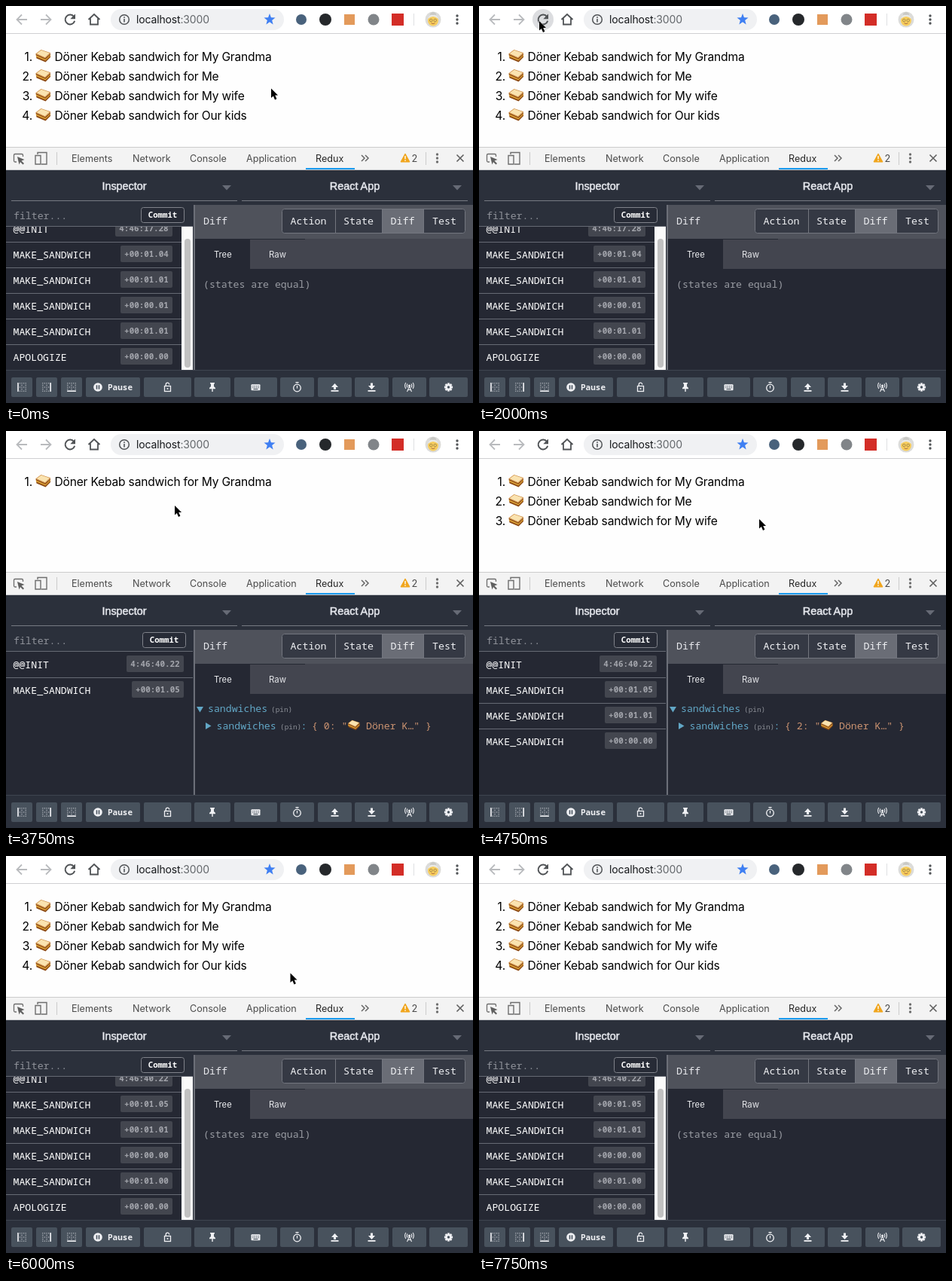
An HTML page that plays this animation: 620 by 527 pixels, repeating every 8500 ms.

```html
<!DOCTYPE html>
<html lang="en">
<head>
<meta charset="utf-8">
<title>Sandwich shop</title>
<style>
  html, body { margin: 0; width: 100%; height: 100%; overflow: hidden; background: #fff; }
  svg { display: block; width: 100vw; height: 100vh; }
  text { white-space: pre; }
  .ui { font-family: Inter, "Open Sans", sans-serif; }
  .head { font-family: "Liberation Sans", Arial, sans-serif; font-size: 14.4px; fill: #e6e8ee; stroke: #e6e8ee; stroke-width: .5; text-anchor: middle; }
  .mono { font-family: "Noto Sans Mono", "DejaVu Sans Mono", monospace; }
  .line { fill: none; stroke-width: 1.8; }
</style>
</head>
<body>
<svg id="stage" viewBox="0 0 620 527" preserveAspectRatio="none"></svg>
<script>
const LOOP = 8500, STEP = 250;
const DARK = '#252833', BAR = '#2b303b', KEY = '#48525d', EDGE = '#666a74', INK = '#505356', ICON = '#f0f1f4';

const rect = (x, y, w, h, fill, more = '') =>
  `<rect x="${x}" y="${y}" width="${w}" height="${h}" fill="${fill}" ${more}/>`;
const circle = (x, y, r, fill, more = '') => `<circle cx="${x}" cy="${y}" r="${r}" fill="${fill}" ${more}/>`;
const path = (d, fill, more = '') => `<path d="${d}" fill="${fill}" ${more}/>`;
const stroke = (d, color, width = 1.8) =>
  `<path class="line" d="${d}" stroke="${color}" style="stroke-width:${width}"/>`;
const text = (cls, x, y, size, fill, str, more = '') =>
  `<text class="${cls}" x="${x}" y="${y}" font-size="${size}" fill="${fill}" ${more}>${str}</text>`;
const ui = (...a) => text('ui', ...a);
const mono = (...a) => text('mono', ...a);
const at = (x, y, body, scale = 1) => `<g transform="translate(${x} ${y}) scale(${scale})">${body}</g>`;
const dots = (x, y, color) => [-5, 0, 5].map(d => circle(x, y + d, 1.7, color)).join('');

const sandwich =
  path('M.5 6.5L13 12L20 6V11L13.5 17.5L1.500 12.500Z', '#8f4d17') +
  path('M.8 8.500L13.300 14L20 7.800V9L13.300 15.300L.9 9.900Z', '#f0b93f') +
  path('M.2 6.500L7.500 1L20.300 5.200L13 12.500Z', '#cf8f45') +
  path('M1.700 6.200L7.700 1.700L18.800 5.400L12.800 11.200Z', '#fae3b0');

const arrow = dir => stroke(`M${7 * dir} 0H${-6 * dir}M0 -6.5L${-6.5 * dir} 0L0 6.5`, '#b9bbbe');
const reloadIcon = stroke('M5.2 -3.8A6.4 6.4 0 1 0 6.2 1.8', INK, 2) + path('M7 -7.5V-.8H.3Z', INK);
const stopIcon = stroke('M-5.5 -5.5L5.5 5.5M5.5 -5.5L-5.5 5.5', INK, 2);
const star = 'M' + Array.from({ length: 10 }, (_, i) => {
  const a = (i / 5 - .5) * Math.PI, r = i % 2 ? 3.3 : 7.9;
  return (r * Math.cos(a)).toFixed(2) + ' ' + (r * Math.sin(a)).toFixed(2);
}).join('L') + 'Z';

function browserBar() {
  return at(21, 18, arrow(1)) + at(53, 18, arrow(-1)) +
    rect(139, 4, 230, 28, '#f0f1f3', 'rx="14"') +
    circle(157, 18, 6.3, 'none', `stroke="${INK}" stroke-width="1.5"`) +
    rect(156.2, 17, 1.6, 4.5, INK) + rect(156.2, 14.2, 1.6, 1.7, INK) +
    ui(173, 23, 14, '#16181b', 'localhost<tspan fill="#63676b">:3000</tspan>', 'letter-spacing="-.15"') +
    at(350, 18, path(star, '#3f7ff2')) +
    circle(392, 18, 7, '#49627c') + circle(424, 18, 8, '#25282b') +
    rect(449, 11, 14, 14, '#e39a5b') + circle(488, 18, 7.5, '#818589') +
    rect(512, 10, 16, 16, '#d32d27') + rect(541, 10, 1, 16, '#dfe0e2') +
    grandma() + dots(599, 18, INK) + rect(0, 36, 620, 1, '#cfd0d2');
}

function grandma() {
  return circle(567, 18, 10.5, '#dcdcda') + circle(567, 12.3, 4.2, '#c9c9c6') +
    circle(567, 19.5, 7, '#f7cd5d') + path('M560 17Q562 11 567 12Q572 11 574 17Q570 14 567 14Q564 14 560 17Z', '#e9e9e6') +
    circle(564.3, 19, 1.8, 'none', 'stroke="#8c7443" stroke-width=".7"') +
    circle(569.7, 19, 1.8, 'none', 'stroke="#8c7443" stroke-width=".7"') +
    stroke('M564.5 22.7Q567 24.5 569.5 22.7', '#a5643c', .9);
}

function toolsBar() {
  const tabs = [[87, 'Elements'], [168, 'Network'], [244, 'Console'], [319, 'Application'], [411, 'Redux']];
  return rect(0, 187, 620, 31, '#f3f3f3') + rect(0, 187, 620, 1, '#cccccc') + rect(0, 217, 620, 1, '#c6c8cb') +
    stroke('M14 207H12Q10.5 207 10.5 205.5V198Q10.5 196.5 12 196.5H21Q22.5 196.5 22.5 198V200', '#6e6e6e', 1.3) +
    path('M15 200L24.5 204L20.5 205.5L24 209L22.5 210.5L19 207L17.5 210.5Z', '#5f5f5f') +
    stroke('M42 197V194.5H54V210H47M39 198.5H46V210H39Z', '#6e6e6e', 1.4) +
    rect(67, 194, 1, 17, '#cccccc') +
    tabs.map(([x, s]) => ui(x, 207, 12.6, s === 'Redux' ? '#262626' : '#4b4b4b', s)).join('') +
    rect(398, 215, 65, 2, '#1a9bef') +
    stroke('M472 198L476 202L472 206M477 198L481 202L477 206', '#666', 1.5) +
    rect(557, 194, 1, 17, '#cccccc') + dots(572.5, 202, '#6e6e6e') +
    stroke('M598.5 197.5L607.5 206.5M607.5 197.5L598.5 206.5', '#5f5f5f', 1.6);
}

function inspectorFrame() {
  const modes = [[366, 71, 'Action'], [437, 62, 'State'], [499, 55, 'Diff'], [554, 56, 'Test']];
  return rect(0, 218, 620, 309, BAR) +
    text('head', 157, 244, 14.4, '#e6e8ee', 'Inspector') + text('head', 463, 244, 14.4, '#e6e8ee', 'React App') +
    rect(7, 258, 300, 1, '#777a83') + rect(313, 258, 300, 1, '#777a83') +
    path('M287 238H299L293 244.5ZM593 238H605L599 244.5Z', '#666a75') +
    mono(10, 283, 13.2, '#8f929a', 'filter...') +
    rect(0, 293, 248, 190, DARK) +
    rect(250, 264, 370, 45, '#4f525b') + rect(250, 309, 370, 174, DARK) +
    rect(324, 310, 296, 39, '#43454f') + rect(397, 309, 223, 1, '#43454f') +
    mono(262, 290, 13.3, '#e8e9ed', 'Diff') +
    rect(366, 269.5, 244, 32, '#353944', 'rx="3"') + rect(499, 270, 55, 31, '#6a6d76') +
    modes.map(([x, w, s], i) =>
      (i ? rect(x, 270, 1, 31, '#73767f') : '') +
      mono(x + w / 2, 290, 13.3, '#f0f1f4', s, 'text-anchor="middle"')).join('') +
    rect(366.5, 269.5, 243, 32, 'none', 'rx="3" stroke="#73767f"') +
    ui(276, 334, 11.2, '#f0f1f4', 'Tree') + ui(349, 334, 11.4, '#e4e5e9', 'Raw');
}

function dockIcon(bar) {
  let s = '';
  for (let i = 0; i < 5; i++)
    for (let j = 0; j < 5; j++)
      if (i % 4 === 0 || j % 4 === 0 || i === 2 || j === 2) s += rect(i * 2.6 - 5.8, j * 2.6 - 5.8, 1.2, 1.2, '#b9bcc4');
  return s + bar;
}

function bottomBar() {
  const base = rect(-5, 4, 10, 1.8, ICON);
  const teeth = [0, 45, 90, 135].map(a => rect(-1.4, -5.6, 2.8, 11.2, ICON, `transform="rotate(${a})"`)).join('');
  const keys = [-3.6, -1.2, 1.2, 3.6].map(x => rect(x - .6, -2, 1.2, 1.2, KEY) + rect(x - .6, 0, 1.2, 1.2, KEY)).join('');
  const buttons = [
    [7, 28, dockIcon(rect(-5.8, -5.8, 1.6, 11.6, ICON))],
    [40, 28, dockIcon(rect(4.4, -5.8, 1.6, 11.6, ICON))],
    [73, 28, dockIcon(rect(-5.8, 4.4, 11.6, 1.6, ICON))],
    [106, 72, at(-20, 0, circle(0, 0, 5.8, ICON) + rect(-2.3, -2.7, 1.6, 5.4, KEY) + rect(.7, -2.7, 1.6, 5.4, KEY)) +
      mono(-7, 4, 11, ICON, 'Pause', 'font-weight="700"')],
    [183, 63, rect(-4, -1.5, 8, 7, 'none', `stroke="${ICON}" stroke-width="1.3"`) + stroke('M-2.3 -1.5V-3.5A2.3 2.3 0 0 1 2.3 -3.5', ICON, 1.3) + circle(0, 2, 1.1, ICON)],
    [250, 48, path('M-3 -6H3V-4.5H2V-1L4 1V2.3H.7V6H-.7V2.3H-4V1L-2 -1V-4.5H-3Z', ICON)],
    [303, 57, rect(-6, -3.7, 12, 8, ICON, 'rx="1"') + keys + rect(-3, 2, 6, 1.1, KEY)],
    [364, 45, circle(0, 1, 4.8, 'none', `stroke="${ICON}" stroke-width="1.3"`) + rect(-2, -7, 4, 1.4, ICON) + rect(-.6, -2, 1.2, 3.6, ICON)],
    [414, 45, path('M0 -5L4.5 0H1.5V3H-1.5V0H-4.5Z', ICON) + base],
    [463, 45, path('M0 3L4.5 -2H1.5V-5.5H-1.5V-2H-4.5Z', ICON) + base],
    [513, 45, circle(0, -2, 1.5, ICON) + stroke('M0 -1L-3 6M0 -1L3 6M-2 3.5H2M-2.5 -4.5Q-4 -2 -2.5 .5M2.5 -4.5Q4 -2 2.5 .5M-4.7 -6Q-7 -2 -4.7 2M4.7 -6Q7 -2 4.7 2', ICON, 1.1)],
    [562, 51, teeth + circle(0, 0, 4, ICON) + circle(0, 0, 1.7, KEY)]
  ];
  return rect(0, 483, 620, 44, BAR) + rect(0, 483, 620, 1, '#3f444f') +
    buttons.map(([x, w, icon]) => rect(x, 493, w, 26, KEY, 'rx="2"') + at(x + w / 2, 506, icon)).join('');
}

const people = ['My Grandma', 'Me', 'My wife', 'Our kids'];
const runs = [
  ['4:46:17.28', '+00:01.04', '+00:01.01', '+00:00.01', '+00:01.01', '+00:00.00'],
  ['4:46:40.22', '+00:01.05', '+00:01.01', '+00:00.00', '+00:01.00', '+00:00.00']
];

function order(count) {
  return people.slice(0, count).map((who, i) => {
    const y = 67 + i * 26, tight = 'letter-spacing="-.2"';
    return ui(35, y + 6, 15.6, '#000', `${i + 1}.`, tight + ' text-anchor="end"') + at(39, y - 10, sandwich) +
      ui(64.5, y + 6, 15.6, '#000', `Döner Kebab sandwich for ${who}`, tight);
  }).join('');
}

function actionLog(stamps) {
  const full = stamps.length > 5, right = full ? 221 : 236, top = full ? 296 : 310;
  const rows = stamps.map((stamp, i) => {
    const y = top + i * 34, w = i ? 69 : 76;
    const name = i === 0 ? '@@INIT' : i === 5 ? 'APOLOGIZE' : 'MAKE_SANDWICH';
    return mono(9.5, y + 5, 13.2, '#fff', name) +
      rect(right - w, y - 12, w, 22, '#43464f', 'rx="2"') +
      mono(right - w / 2, y + 3, 10.9, '#a3a5ac', stamp, 'text-anchor="middle" font-weight="600"') +
      (i < stamps.length - 1 ? rect(0, y + 17, full ? 233 : 248, 1, EDGE) : '');
  }).join('');
  const bar = full ? rect(233, 293, 15, 190, '#fafafa') + rect(237, 309, 8, 171, '#c1c1c1', 'rx="4"') : '';
  return `<g clip-path="url(#log)">${rows}${bar}</g>` +
    rect(0, 292, 248, 1, EDGE) + rect(249, 264, 2, 219, '#6c6f78');
}

function diffTree(index) {
  const blue = '#62a7c6', tan = '#cb9371';
  const pin = (x, y) => mono(x, y, 9.4, '#8d9098', '(pin)');
  return path('M253 366H262L257.5 373.5ZM265 387V396L272.5 391.5Z', blue) +
    mono(268, 373, 13.2, blue, 'sandwiches') + pin(352, 373) +
    mono(279.5, 396, 13.2, blue, 'sandwiches') + pin(364, 396) + mono(391.5, 396, 13.2, blue, ':') +
    mono(406, 396, 13.2, tan, `{ ${index}: "`) + at(453.5, 383, sandwich, .8) +
    mono(478, 396, 13.2, tan, 'Döner K…" }');
}

const commit = x => rect(x + .5, 267.5, 57, 20, '#272b36', 'rx="3" stroke="#80838b"') +
  mono(x + 29, 281, 10.7, '#fff', 'Commit', 'text-anchor="middle" font-weight="700"');

const warning = path('M530 196L536 207H524Z', '#f0a51c', 'stroke="#f0a51c" stroke-linejoin="round"') +
  rect(529.3, 199, 1.4, 4.2, '#fff') + rect(529.3, 204.4, 1.4, 1.5, '#fff') + ui(538.5, 207, 12.8, '#4b4b4b', '2');

const pointer = path('M0 0V13.2L3 10.4L5.3 15.7L7.8 14.6L5.5 9.5H9.5Z', '#000',
  'stroke="#fff" stroke-width="1" paint-order="stroke"');

// time, x, y of the pointer tip
const track = [
  [250, 352, 109.5], [1500, 86, 37], [1750, 80, 21], [2000, 80, 20], [2250, 80, 20], [2750, 224, 99],
  [3750, 224, 99], [4500, 372, 115], [4750, 372, 117], [5500, 376, 148], [5750, 376, 148],
  [6250, 379, 163], [6500, 379, 163], [7500, 112, 19]
];

function pointerAt(t) {
  if (t > 7500) return '';
  const k = track.findIndex(p => p[0] >= t);
  const b = track[k], a = track[Math.max(0, k - 1)];
  const u = a === b ? 0 : (t - a[0]) / (b[0] - a[0]), e = u * u * (3 - 2 * u);
  const mix = i => a[i] + (b[i] - a[i]) * e;
  return at(mix(1), mix(2), pointer, .95);
}

// number of logged actions at time t
const logged = t => t < 3000 || t >= 6000 ? 6 : t >= 4750 ? 4 : t >= 3500 ? 2 : 1;

const stage = document.getElementById('stage');
stage.innerHTML =
  '<defs><clipPath id="log"><rect y="293" width="248" height="190"/></clipPath></defs>' +
  rect(0, 0, 620, 527, '#fff') + rect(0, 37, 620, 150, '#fefefe') +
  browserBar() + toolsBar() + inspectorFrame() + bottomBar() + '<g id="live"></g>';
const live = document.getElementById('live');

function draw(t) {
  const n = logged(t), loading = t >= 2250 && t < 3000, blank = t >= 2500 && t < 3000;
  const hover = t >= 1750 && t < 2500 ? 85 : t === 7500 ? 117 : 0;
  live.innerHTML =
    (hover ? circle(hover, 18, 14, '#dcdde0') : '') +
    at(85, 18, loading ? stopIcon : reloadIcon) +
    at(117, 18, stroke('M-7.5 0L0 -7L7.5 0M-5 -1.5V6.5H5V-1.5', INK)) +
    order(blank ? 0 : Math.min(4, n - 1)) + (blank ? '' : warning) +
    commit(t >= 3000 && t < 4750 ? 181 : 179) +
    actionLog(runs[t < 3000 ? 0 : 1].slice(0, n)) +
    (n === 6 ? mono(262, 374, 13.2, '#999ca3', '(states are equal)') : n > 1 ? diffTree(n - 2) : '') +
    pointerAt(t);
}

let shown = -1;
function tick() {
  const t = Math.floor(performance.now() % LOOP / STEP) * STEP;
  if (t !== shown) draw(shown = t);
  requestAnimationFrame(tick);
}
tick();
</script>
</body>
</html>
```
